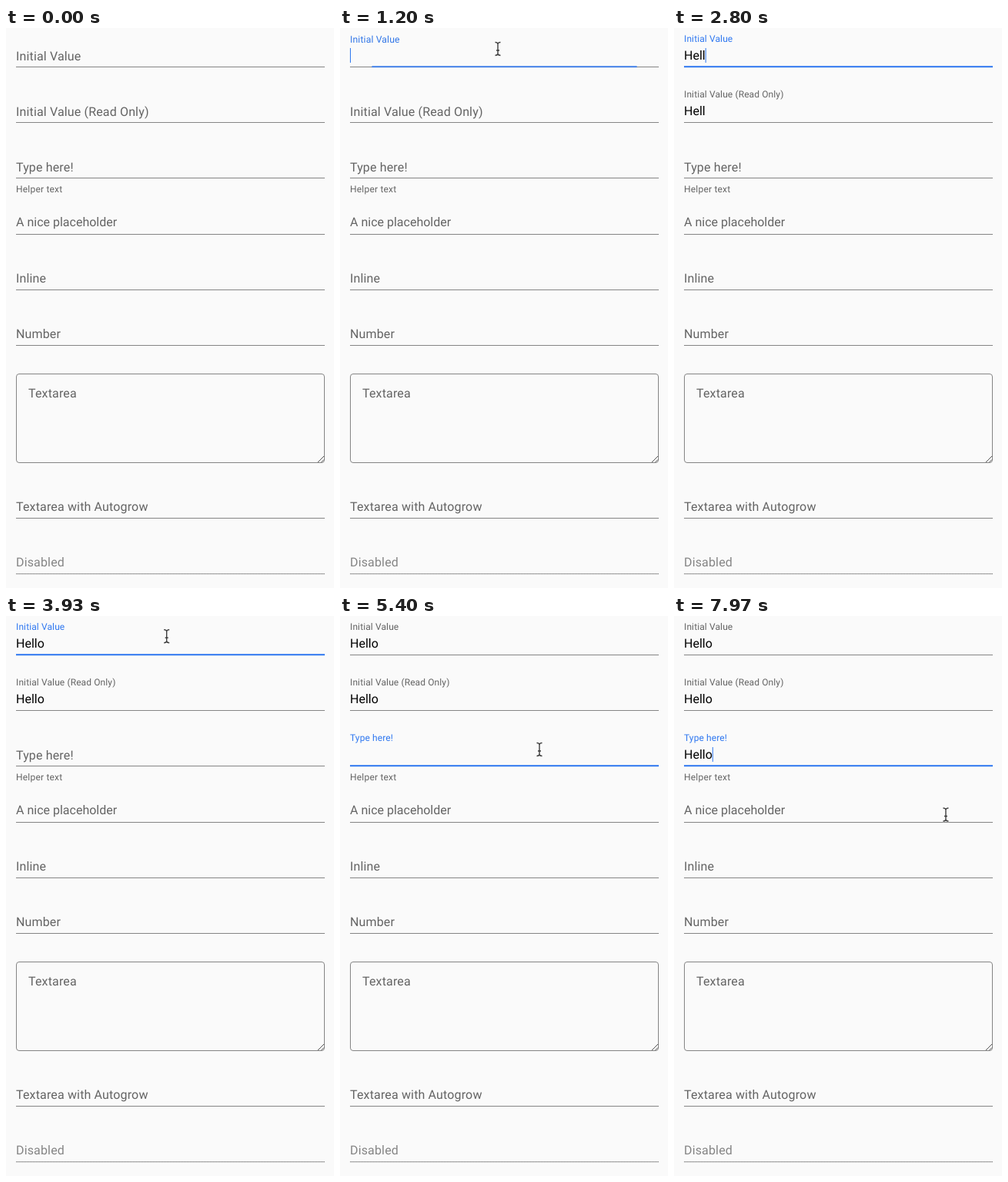
An HTML page that plays this animation: 426 by 726 pixels, repeating every 8000 ms.

```html
<!DOCTYPE html>
<html lang="en">
<head>
<meta charset="utf-8">
<title>Text fields</title>
<style>
  html, body { margin: 0; width: 100%; height: 100%; overflow: hidden; background: #fafafa; }
  svg { display: block; width: 426px; height: 726px; }
  text { font: 16px Roboto, sans-serif; letter-spacing: .15px; white-space: pre; text-rendering: geometricPrecision; }
  .help { font-size: 12px; letter-spacing: .2px; }
  .input { letter-spacing: 0; }
</style>
</head>
<body>
<svg id="stage" viewBox="0 0 426 726"></svg>
<script>
const LOOP = 8000;
const LEFT = 13, RIGHT = 414, MID = (LEFT + RIGHT) / 2;
const GREY = [100, 100, 100], BLUE = [48, 120, 240];
const stage = document.getElementById('stage');

function add(tag, attrs, content = '') {
  const el = document.createElementNS('http://www.w3.org/2000/svg', tag);
  set(el, attrs);
  el.textContent = content;
  stage.append(el);
  return el;
}
function set(el, attrs) {
  for (const k in attrs) el.setAttribute(k, attrs[k]);
}
const rgb = c => `rgb(${c.map(Math.round)})`;
const mix = (a, b, k) => a + (b - a) * k;
const progress = (t, start, length) => Math.min(1, Math.max(0, (t - start) / length));

// cubic-bezier(.4, 0, .2, 1)
function ease(p) {
  let lo = 0, hi = 1, u = p;
  for (let i = 0; i < 24; i++) {
    u = (lo + hi) / 2;
    const x = 1.2 * u * (1 - u) ** 2 + 0.6 * u * u * (1 - u) + u ** 3;
    if (x < p) lo = u; else hi = u;
  }
  return p <= 0 ? 0 : p >= 1 ? 1 : 3 * u * u * (1 - u) + u ** 3;
}

const underline = bottom => add('rect', { x: LEFT, y: bottom - 1, width: RIGHT - LEFT, height: 1, fill: '#858585' });
const label = (str, y, x = LEFT, fill = rgb(GREY)) => add('text', { x, y, fill }, str);

// Fields that never change
label('A nice placeholder', 257).setAttribute('class', 'input');
label('Inline', 330);
label('Number', 402);
label('Textarea with Autogrow', 626);
[268, 340, 412, 636].forEach(underline);
add('text', { x: LEFT, y: 213, fill: rgb(GREY), class: 'help' }, 'Helper text');
add('rect', { x: 13.5, y: 448.5, width: 400, height: 115, rx: 3.5, fill: 'none', stroke: '#858585' });
label('Textarea', 479, 29);
add('path', { d: 'M405 563l8-8M409.5 563l3.5-3.5', stroke: '#555', fill: 'none' });
label('Disabled', 698, LEFT, '#858585');
add('path', { d: 'M13 707.7H414', stroke: '#777', 'stroke-dasharray': '1 1' });
add('path', { d: 'M13 707.7H414', stroke: '#aaa', 'stroke-dasharray': '1 1', 'stroke-dashoffset': 1 });

// Animated fields: times of floating, focus, blur and each typed letter
const firstKeys = [2030, 2300, 2600, 2770, 3130];
const thirdKeys = [5770, 6000, 6200, 6370, 6730];
const fields = [
  { str: 'Initial Value', top: 0, float: 1010, focus: 1010, blur: 4880, keys: firstKeys },
  { str: 'Initial Value (Read Only)', top: 72, float: 2010, focus: Infinity, blur: Infinity, keys: firstKeys },
  { str: 'Type here!', top: 144, float: 4880, focus: 4880, blur: Infinity, keys: thirdKeys }
];
for (const f of fields) {
  underline(51 + f.top);
  f.ripple = add('rect', { y: 49.2 + f.top, height: 2, fill: rgb(BLUE) });
  f.label = add('text', {}, f.str);
  f.value = add('text', { x: LEFT, y: 41 + f.top, fill: '#000', class: 'input' });
}

const caret = add('rect', { width: 1, height: 19, fill: rgb(BLUE) });
const stops = [0, 11.4, 19.9, 23.8, 27.7, 36.8];
const caretOn = [[1030, 1530], [2030, 3630], [4130, 4630], [4900, 5400], [5770, 7230], [7730, LOOP]];

const beam = 'M-3.5 -8.5Q-.5 -8.5 0 -6.5Q.5 -8.5 3.5 -8.5M0 -7V7M-3.5 8.5Q-.5 8.5 0 6.5Q.5 8.5 3.5 8.5M-2 2H2';
const pointer = [
  add('path', { d: beam, fill: 'none', stroke: '#fff', 'stroke-width': 2.6 }),
  add('path', { d: beam, fill: 'none', stroke: '#3c3c3c', 'stroke-width': 1.4 })
];
// Each move: start, end, hide time, from, to, easing
const slow = o => 1 - (1 - o) ** 2;
const moves = [
  [550, 870, 2030, [245, -9], [205, 27], slow],
  [3880, 4230, 4230, [205, 27], [377, -10], o => o * o],
  [4500, 4730, 5790, [398, 202], [259, 173], slow],
  [7380, 7570, 7570, [259, 173], [384, 166], o => o ** 1.5],
  [7895, 7970, LOOP, [422, 273], [353, 257.5], slow]
];

function drawField(f, t) {
  const up = ease(progress(t, f.float, 275));
  const gone = ease(progress(t, f.blur, 300));
  const lit = ease(progress(t, f.focus, 275)) * (1 - gone);
  set(f.label, {
    transform: `translate(${LEFT} ${mix(41.7, 17.6, up) + f.top}) scale(${mix(1, .75, up)})`,
    fill: rgb(GREY.map((c, i) => mix(c, BLUE[i], lit)))
  });
  const spread = ease(progress(t, f.focus, 330));
  const half = (RIGHT - MID) * spread;
  set(f.ripple, { x: MID - half, width: 2 * half, opacity: spread * (1 - gone) });
  const typed = f.keys.filter(k => t >= k).length;
  f.value.textContent = 'Hello'.slice(0, typed);
  return typed;
}

function draw(t) {
  const typed = fields.map(f => drawField(f, t));
  const active = t < 4880 ? 0 : 2;
  set(caret, {
    x: LEFT + stops[typed[active]],
    y: 26 + fields[active].top,
    visibility: caretOn.some(([a, b]) => t >= a && t < b) ? 'visible' : 'hidden'
  });

  const move = moves.find(m => t >= m[0] && t < m[2]);
  for (const p of pointer) {
    p.setAttribute('visibility', move ? 'visible' : 'hidden');
    if (!move) continue;
    const [start, end, , from, to, curve] = move;
    const k = curve(progress(t, start, end - start));
    p.setAttribute('transform', `translate(${mix(from[0], to[0], k)} ${mix(from[1], to[1], k)})`);
  }
}

const began = performance.now();
function tick() {
  draw((performance.now() - began) % LOOP);
  requestAnimationFrame(tick);
}
draw(0);
requestAnimationFrame(tick);
</script>
</body>
</html>
```
